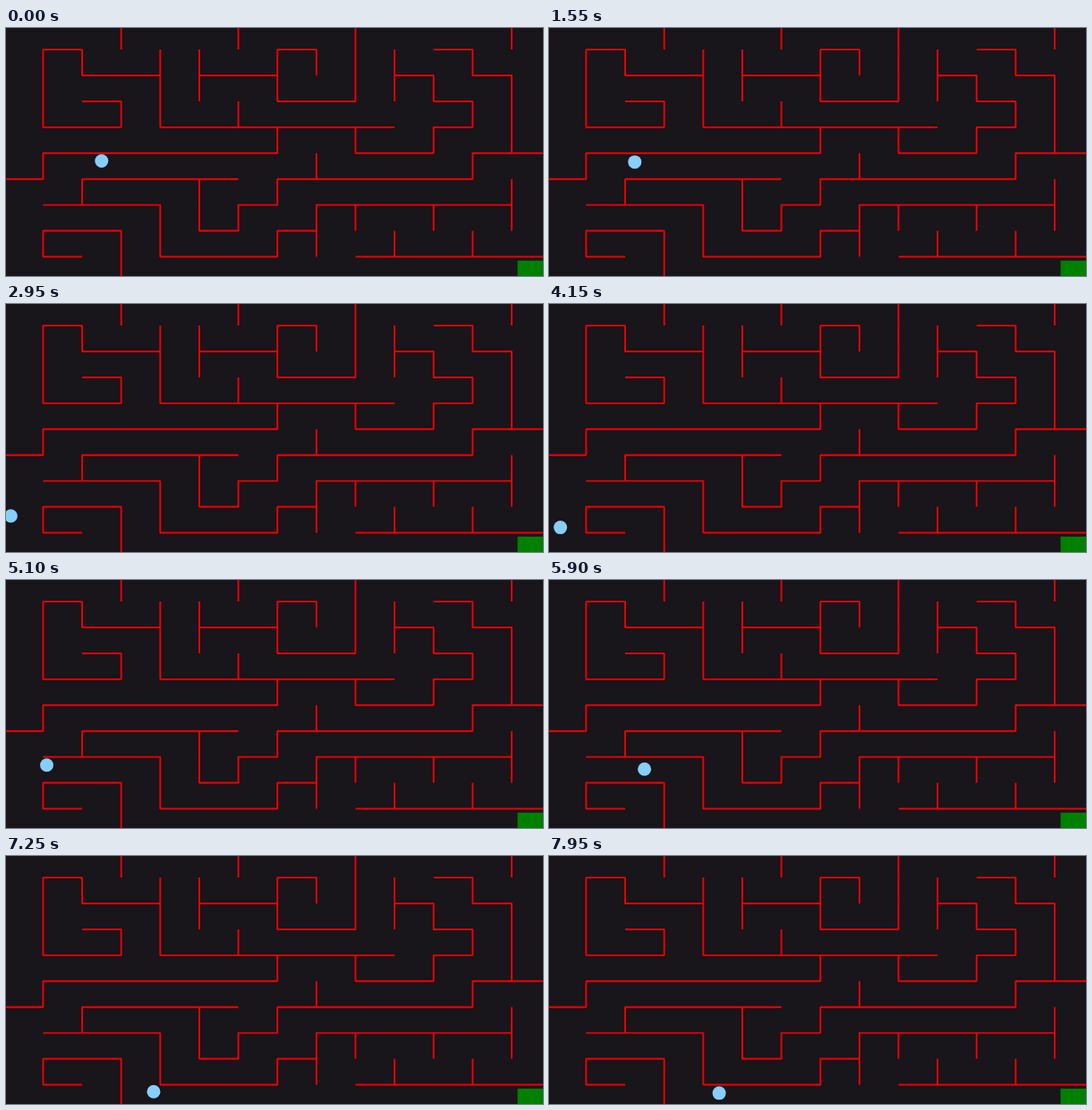
An HTML page that plays this animation: 600 px wide and 277 px high, repeating every 8 s.

```html
<!DOCTYPE html>
<html lang="en">
<head>
<meta charset="utf-8">
<title>Maze</title>
<style>
  html, body { margin: 0; width: 100%; height: 100%; overflow: hidden; background: #18151b; }
  svg { display: block; width: 600px; height: 277px; }
  #walls { fill: none; stroke: #f00000; stroke-width: 1.9px; stroke-linejoin: bevel; }
</style>
</head>
<body>
<svg viewBox="0 0 600 277">
  <rect id="goal" fill="#008000"/>
  <path id="walls"/>
  <circle id="ball" r="7.5" fill="#87cefa"/>
</svg>
<script>
  const LOOP = 8000, STEP = 50, DEPART = 850, LEG = 425;
  const CELL = { x: 41.45, y: 24.1, w: 43.63, h: 28.92 };
  const [goal, walls, ball] = ['goal', 'walls', 'ball'].map(id => document.getElementById(id));

  const setAll = (el, attrs) => Object.entries(attrs).forEach(([k, v]) => el.setAttribute(k, v));
  const corner = (col, row) => [CELL.x + col * CELL.w, CELL.y + row * CELL.h];

  // Each wall: starting column and row, then one letter per cell side
  const plan = `2,-1 D; 5,-1 D; 12,-1 D; 1,2 RDLLUUURDRR; 3,0 DDDRRRRRR; 5,2 D;
    4,0 DD; 4,1 RR; 7,1 ULDDRRUUU; 9,0 DD; 9,1 RDRDLDLLU; 10,0 RDRDDD;
    13,4 LLDLLLLLDLDLUU; 7,4 D; 6,3 DLLLLLLDL; 1,6 URRRR; 0,6 RRRDDRRRUR;
    7,8 UURRRRR; 8,6 D; 10,6 D; 12,5 DD; 8,8 RRRRR; 9,7 D; 11,7 D; 1,8 LURRDD`;
  const moves = { R: `h${CELL.w}`, L: `h${-CELL.w}`, D: `v${CELL.h}`, U: `v${-CELL.h}` };

  function wallPath(wall) {
    const [start, sides] = wall.trim().split(' ');
    return 'M' + corner(...start.split(',').map(Number)) + [...sides].map(s => moves[s]).join('');
  }
  walls.setAttribute('d', plan.split(';').map(wallPath).join(''));

  // The goal fills the last cell, inset by 15 % on each side
  const [goalX, goalY] = corner(12.15, 8.15);
  setAll(goal, { x: goalX, y: goalY, width: CELL.w * 0.7, height: CELL.h * 0.7 });

  // Evenly timed key points, joined by a smooth curve
  const route = [
    [106.8, 148.5], [100, 147.7], [90.8, 153], [59, 175], [23, 202], [4.7, 238.7],
    [2, 269.5], [9, 271], [14.3, 242], [25, 211], [45.5, 206.8], [78, 211],
    [111, 211.5], [154, 217.5], [165, 243.5], [164.5, 262.5], [179, 269.7], [192, 263.5]
  ];

  const slope = (i, axis) =>
    route[i - 1] && route[i + 1] ? (route[i + 1][axis] - route[i - 1][axis]) / 2 : 0;

  function coordinate(progress, axis) {
    const i = Math.floor(progress), u = progress - i, v = 1 - u;
    return v * v * (1 + 2 * u) * route[i][axis] + u * u * (3 - 2 * u) * route[i + 1][axis]
      + u * v * (v * slope(i, axis) - u * slope(i + 1, axis));
  }

  function draw(now) {
    const time = Math.floor((now % LOOP) / STEP) * STEP;
    const progress = Math.max(0, time - DEPART) / LEG;
    setAll(ball, { cx: coordinate(progress, 0), cy: coordinate(progress, 1) });
  }

  const start = performance.now();
  function tick() {
    draw(performance.now() - start);
    requestAnimationFrame(tick);
  }
  tick();
</script>
</body>
</html>
```
